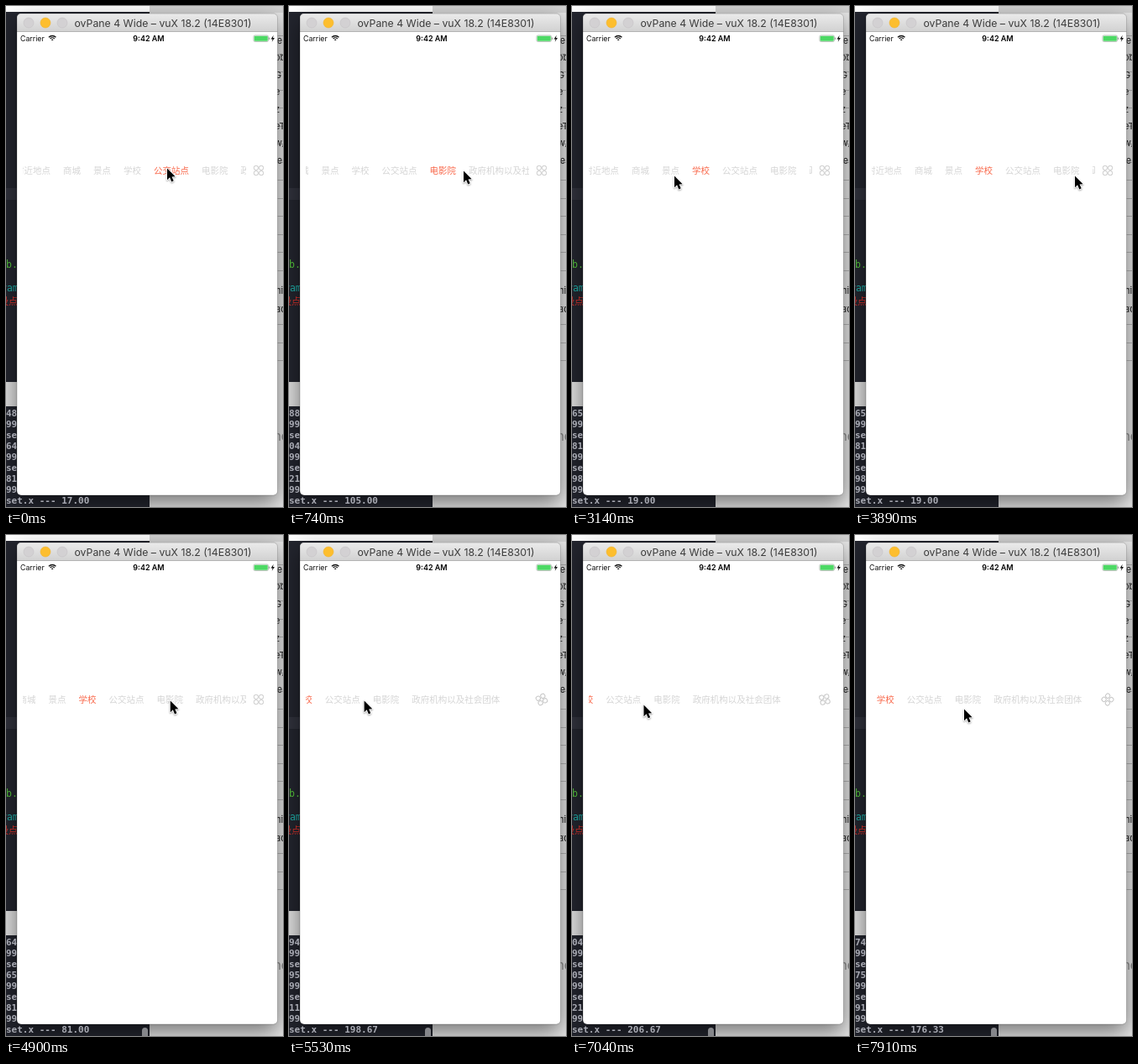
An HTML page with a canvas for the animation above (8000 ms loop, 330 px wide and 597 px high).

```html
<!DOCTYPE html>
<html lang="zh-CN">
<head>
<meta charset="utf-8">
<style>
  html, body { margin: 0; width: 100%; height: 100%; overflow: hidden; background: #ccc; }
  canvas { display: block; width: 330px; height: 597px; }
</style>
</head>
<body>
<canvas id="stage"></canvas>
<script>
const W = 330, H = 597, LOOP = 8000;
const canvas = document.getElementById('stage');
const scale = window.devicePixelRatio || 1;
const SANS = 'Inter, sans-serif';
const CJK = '"Noto Sans CJK SC", "Noto Sans CJK", sans-serif';
const MONO = '"DejaVu Sans Mono", monospace';

const clamp = (v, lo, hi) => Math.max(lo, Math.min(hi, v));
const smooth = v => {
  const p = clamp(v, 0, 1);
  return p * p * (3 - 2 * p);
};
const mix = (a, b, p) => a + (b - a) * p;

// Tab strip, in a 267 px wide view centred on x = 153.5
const CHAR = 10.5, GAP = 15, VIEW = 267, MIDDLE = 153.5;
const MIN = -17, MAX = 106;
let edge = 11;
const tabs = ['附近地点', '商城', '景点', '学校', '公交站点', '电影院', '政府机构以及社会团体'].map(label => {
  const x = edge, width = label.length * CHAR;
  edge += width + GAP;
  return { label, x, rest: clamp(x + width / 2 - MIDDLE, MIN, MAX) };
});

// A tap selects a tab and scrolls it to the middle
const GLIDE = 318;
let from = MIN;
const taps = [[-110, 4], [598, 5], [1520, 6], [2330, 4], [2700, 3]].map(([start, tab]) => {
  const tap = { start, tab, from, to: tabs[tab].rest };
  from = tap.to;
  return tap;
});
const tapAt = t => taps.filter(tap => t >= tap.start).pop();

// Pointer moves before the drag: start, end, x, y
const moves = [
  [20, 590, 208, 195], [920, 1210, 238, 197], [1800, 2210, 108, 191], [2400, 2680, 112, 198],
  [2800, 3080, 122, 201], [3140, 3400, 84, 209], [3400, 3890, 262, 201], [4310, 4370, 262, 197]
];
const DRAG = 4670, TURN = 6180, DRAG_END = 7910, GRAB = 251.5;

function pointerAt(t) {
  let x = 192, y = 192;
  for (const [start, end, toX, toY] of moves) {
    const p = smooth((t - start) / (end - start));
    x = mix(x, toX, p);
    y = mix(y, toY, p);
  }
  if (t > DRAG) {
    x = 5 + 257 * Math.exp((DRAG - Math.min(t, TURN)) / 775);
    const p = smooth((t - TURN) / (DRAG_END - TURN));
    x = mix(x, 130, p);
    y = mix(196, 206, p);
  }
  return [x, y];
}

// Dragging past the end stretches like a rubber band
function scrollAt(t) {
  if (t >= DRAG) {
    const raw = Math.max(tabs[3].rest, GRAB - pointerAt(t - 9)[0]);
    const over = raw - MAX;
    return over <= 0 ? raw : MAX + (1 - 1 / (over * 0.55 / VIEW + 1)) * VIEW;
  }
  const tap = tapAt(t);
  return mix(tap.from, tap.to, smooth((t - tap.start) / GLIDE));
}

let g;

function text(str, x, y, font, color, align = 'left') {
  g.font = font;
  g.fillStyle = color;
  g.textAlign = align;
  g.fillText(str, x, y);
}

function rect(x, y, w, h, color) {
  g.fillStyle = color;
  g.fillRect(x, y, w, h);
}

function paint(fill, stroke, width = 0.6) {
  if (fill) {
    g.fillStyle = fill;
    g.fill();
  }
  if (stroke) {
    g.strokeStyle = stroke;
    g.lineWidth = width;
    g.stroke();
  }
}

function roundRect(x, y, w, h, r, ...style) {
  g.beginPath();
  g.roundRect(x, y, w, h, r);
  paint(...style);
}

function arc(x, y, r, a, b, ...style) {
  g.beginPath();
  g.arc(x, y, r, a, b);
  paint(...style);
}

function shape(points, ...style) {
  g.beginPath();
  points.forEach(([x, y]) => g.lineTo(x, y));
  g.closePath();
  paint(...style);
}

function drawDesktop() {
  rect(0, 0, W, H, '#e6e6e6');
  rect(171, 0, 159, 8, '#d2d2d2');
  rect(0, 0, 171, 7, '#fff');
  rect(0, 7, 171, 590, '#23252e');
  rect(0, 217, 171, 14, '#30323c');
  rect(0, 448, 171, 29, '#dedede');

  text('b.', 0, 312, '11.5px ' + MONO, '#55c33c');
  text('ram', -6, 340, '11.5px ' + MONO, '#1fb3ac');
  text('设点', -8, 356, '11px ' + CJK, '#e0322c');

  for (let y = 35; y < 425; y += 21.5) rect(322, Math.round(y), 8, 1, '#b4b4b4');
  'le obj G e z eT w/ le'.split(' ').forEach((s, i) => text(s, 320, 45 + i * 20.4, '11px ' + SANS, '#222'));
  text('ni', 321, 343, '11px ' + SANS, '#222');
  text('ad', 321, 365, '11px ' + SANS, '#222');
  text('ne', 319, 518, '15px ' + SANS, '#8a8a8a');
}

function drawWindow() {
  g.save();
  g.shadowColor = 'rgba(0,0,0,.5)';
  g.shadowBlur = 26 * scale;
  g.shadowOffsetY = 9 * scale;
  roundRect(13, 9, 310.5, 574, 5, '#fff');
  g.restore();

  const bar = g.createLinearGradient(0, 9, 0, 30);
  bar.addColorStop(0, '#ebebeb');
  bar.addColorStop(1, '#d2d2d2');
  roundRect(13, 9, 310.5, 21.5, [5, 5, 0, 0], bar);
  rect(13, 30, 310.5, 1, '#b3b3b3');
  roundRect(13, 9, 310.5, 574, 5, null, 'rgba(0,0,0,.35)');

  ['#d3d1d3', '#fdbe2e', '#d3d1d3'].forEach((color, i) =>
    arc(27 + i * 20, 20, 6, 0, 7, color, i === 1 ? '#f0b32c' : '#c4c2c4'));
  text('ovPane 4 Wide – vuX 18.2 (14E8301)', 187, 25, '12.3px ' + SANS, '#3c3c3c', 'center');
}

function drawStatusBar() {
  text('Carrier', 17, 42, '8.8px ' + SANS, '#111');
  text('9:42 AM', 170, 42, '600 9px ' + SANS, '#000', 'center');

  const left = -Math.PI * 0.75, right = -Math.PI * 0.25;
  for (const r of [1.2, 3.6, 6]) arc(55.2, 41.5, r, left, right, null, '#111', 1.3);

  roundRect(295, 35, 17.5, 7.5, 1.6, '#fff', '#8c9a8e');
  roundRect(295.7, 35.7, 16.1, 6.1, 1, '#4cd964');
  rect(313.2, 37.5, 1, 2.6, '#8c9a8e');
  shape([[318.7, 34.8], [315.6, 39.4], [317.6, 39.4], [316.8, 42.8], [320, 38], [318, 38]], '#111');
}

function drawTabs(scroll, selected) {
  g.save();
  g.beginPath();
  g.rect(20, 185, 266, 24);
  g.clip();
  tabs.forEach(({ label, x }, i) =>
    text(label, x - scroll, 200, CHAR + 'px ' + CJK, i === selected ? '#f9694c' : '#d5d5d5'));
  g.restore();
}

function drawIcon(angle) {
  g.save();
  g.translate(301, 196);
  g.rotate(angle * Math.PI / 180);
  for (let i = 0; i < 4; i++) {
    roundRect(0.6, 0.6, 5, 5, 2.1, null, '#c6c6c6', 1);
    g.rotate(Math.PI / 2);
  }
  g.restore();
}

// Log output: two earlier entries peek out left of the window
function drawConsole(t) {
  const dragging = t > DRAG + 50;
  const active = dragging ? t : Math.min(t, tapAt(t).start + GLIDE);
  const stamp = Math.round(active) + 80;
  const offset = 23 + 1.34 * scrollAt(t - (dragging ? 40 : 18));
  const value = (Math.round(offset * 3) / 3).toFixed(2);
  for (let i = 0; i < 3; i++) {
    const ago = dragging && i < 2 ? 17 - i : (2 - i) * 16.5;
    const lines = [
      String(Math.floor(stamp - ago) % 100).padStart(2, '0'),
      '99',
      i < 2 ? 'se' : 'set.x --- ' + value
    ];
    lines.forEach((s, j) => text(s, 0, 489 + (i * 3 + j) * 13, 'bold 11px ' + MONO, '#a9abb4'));
  }
  if (dragging) roundRect(162, 587, 7, 14, 3.5, '#85868a');
}

function drawPointer([x, y]) {
  g.save();
  g.translate(x, y + 1.5);
  g.scale(0.94, 0.94);
  g.lineJoin = 'round';
  g.shadowColor = 'rgba(0,0,0,.35)';
  g.shadowBlur = 2 * scale;
  g.shadowOffsetY = scale;
  const arrow = [[0, 0], [0, 14.6], [3.3, 11.5], [5.6, 16.9], [8.2, 15.8], [5.9, 10.6], [10.3, 10.4]];
  shape(arrow, null, '#fff', 1.8);
  g.shadowColor = 'transparent';
  shape(arrow, '#000');
  g.restore();
}

function surface(c) {
  c.width = W * scale;
  c.height = H * scale;
  const ctx = c.getContext('2d');
  ctx.scale(scale, scale);
  return ctx;
}

const front = surface(canvas);
const backdrop = document.createElement('canvas');
g = surface(backdrop);
drawDesktop();
drawWindow();
drawStatusBar();
g = front;

function draw(t) {
  const scroll = scrollAt(t);
  g.drawImage(backdrop, 0, 0, W, H);
  g.save();
  g.beginPath();
  g.rect(0, 478, 12.6, 119);
  g.rect(0, 583.5, 171, 14);
  g.clip();
  drawConsole(t);
  g.restore();
  drawTabs(scroll, tapAt(t).tab);
  drawIcon(Math.max(0, scroll - MAX) * 5.65);
  drawPointer(pointerAt(t));
}

const begin = performance.now();
function tick() {
  draw((performance.now() - begin) % LOOP);
  requestAnimationFrame(tick);
}
tick();
</script>
</body>
</html>
```
